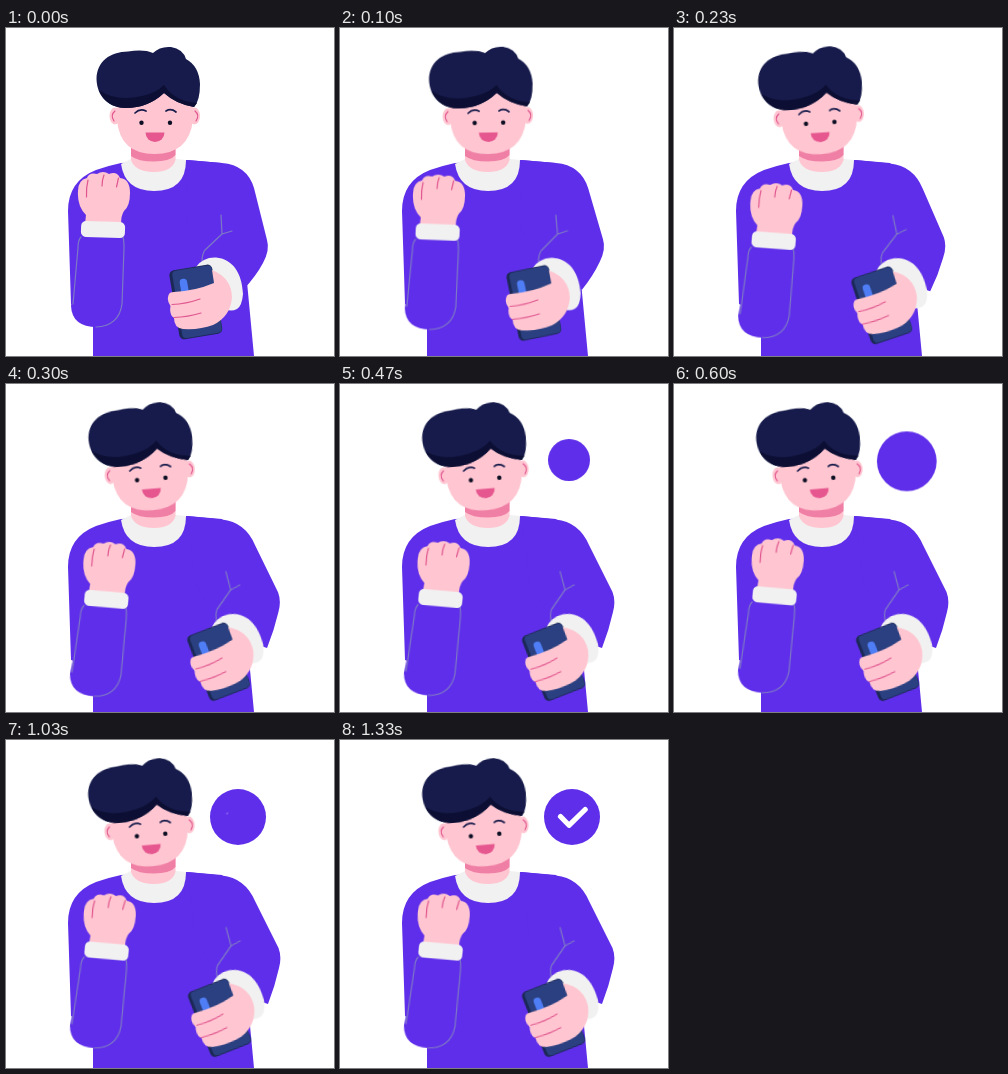
An HTML page that plays this animation: 328 px wide and 328 px high, repeating every 1960 ms.

```html
<!DOCTYPE html>
<html lang="en">
<head>
<meta charset="utf-8">
<title>Confirmed</title>
<style>
  html, body { margin: 0; width: 100%; height: 100%; overflow: hidden; background: #fff; }
  svg { display: block; width: 100vw; height: 100vh; }

  .purple { fill: #5f2eea; }
  .skin { fill: #ffc6d1; }
  .cloth { fill: #f1f1f1; }
  .hair { fill: #171b4b; }
  .line { fill: none; stroke-width: 1.2; stroke-linecap: round; stroke-linejoin: round; }
  .seam { stroke: #7d78c4; }
  .pink { stroke: #e0568f; }
  .brow { stroke: #171b4b; stroke-width: 1.7; }

  .head, .fist, .sleeve, .hand, .badge, .tick { animation: 1960ms linear infinite; }
  .head { transform-origin: 150px 148px; animation-name: tilt; }
  .fist { transform-origin: 90px 285px; animation-name: pump; }
  .sleeve { animation-name: bend; }
  .hand { transform-origin: 220px 163px; animation-name: swing; }
  .badge, .tick { transform-origin: 220px 73px; }
  .badge { animation-name: badge; }
  .tick { animation-name: tick; }

  @keyframes tilt {
    0% { transform: rotate(0deg); animation-timing-function: ease-in-out; }
    17.86%, 100% { transform: rotate(-5deg); }
  }
  @keyframes pump {
    0% { transform: translate(0, 0) rotate(0deg); animation-timing-function: ease-in-out; }
    17.4% { transform: translate(-1.5px, 13.7px) rotate(3.4deg); animation-timing-function: ease-in-out; }
    35.7%, 100% { transform: translate(-1.5px, 9px) rotate(3.5deg); }
  }
  @keyframes swing {
    0% { transform: rotate(0deg); animation-timing-function: ease-in-out; }
    17.86%, 100% { transform: rotate(-12deg); }
  }
  @keyframes bend {
    0% {
      d: path("M181 132 L216 135 Q241 137 248 160 L261 212 Q264 222 257 235 Q250 248 238 261 L200 250 L180 200 Z");
      animation-timing-function: ease-in-out;
    }
    17.86%, 100% {
      d: path("M181 132 L216 135.5 Q239 138 249 161 L272.5 208 Q276 217 273 228 Q269 246 262 264 L220 250 L190 200 Z");
    }
  }
  @keyframes badge {
    0%, 17.86% { transform: scale(0); animation-timing-function: cubic-bezier(.2, .5, .5, 1); }
    34% { transform: scale(1.1); animation-timing-function: ease-in-out; }
    44.2%, 100% { transform: scale(1); }
  }
  @keyframes tick {
    0%, 52.3% { transform: scale(0); animation-timing-function: cubic-bezier(.2, .5, .5, 1); }
    61.7% { transform: scale(1.05); animation-timing-function: ease-in-out; }
    67.9%, 100% { transform: scale(1); }
  }
</style>
</head>
<body>
<svg viewBox="0 0 328 328">
  <!-- torso, neck, collar -->
  <path class="purple" d="M115 135 Q101 138 90 142 Q62 153 62 183 L65 276 L87 284 V328 H248 L241 254 L240 170 L216 135 L181 132 Z"/>
  <path class="cloth" d="M115 136 L125 131 H170 L180 132 Q180 163 148 163 Q119 163 115 136 Z"/>
  <path class="skin" d="M125 112 H169.500 V132 Q166 144 148 144 Q129 144 125 132 Z"/>
  <path fill="#f07fa5" d="M125 112 H169.500 V127 Q164 133.500 148 133.500 Q132 133.500 125 128 Z"/>

  <g class="head">
    <ellipse class="skin" cx="109" cy="88" rx="5.5" ry="8.5"/>
    <ellipse class="skin" cx="188.5" cy="88" rx="5.5" ry="8.5"/>
    <path class="line pink" d="M109 83 Q104 87 108 93 M189 83 Q194 87 190 93"/>
    <path class="skin" d="M111 62 V92 Q114 126 148.500 126 Q183 126 187 92 V62 Z"/>
    <path class="hair" d="M90.500 51 C91 33 104 24 122 23.500 Q138 21 147 25 Q154 18 165 19 Q177 21 180 31 Q193 38 194 56 Q194 73 188 79 Q170 76 158 65 Q142 80 120 80 C103 80 91 69 90.500 51 Z"/>
    <path fill="#0c0f33" d="M93 62 Q110 74 136 68 Q150 65 158 57 Q168 73 191 75 L188 79 Q170 76 158 65 Q142 80 120 80 C107 80 97 73 93 62 Z"/>
    <path class="line brow" d="M129 85 Q134 80 140 83 M160 83 Q165 80 170 84"/>
    <circle cx="135.500" cy="94.700" r="2.200" fill="#0c0f23"/>
    <circle cx="164" cy="94.700" r="2.200" fill="#0c0f23"/>
    <path fill="#e6568f" d="M139.500 104.500 H158.500 A9.500 9.500 0 0 1 139.500 104.500 Z"/>
  </g>

  <g class="fist">
    <path class="purple" d="M75 209 L65 278 Q66 299 91 299 Q115 298 116 275 L118 209 Z"/>
    <path class="line seam" d="M75 209 Q72 212 72 220 L67 276 M117 209 Q118 212 118 220 L116 276 Q113 298 90 299"/>
    <path class="skin" d="M79 196 L80 187 Q71 178 72 163 Q72 152 81 150 Q83 144 91 146 Q97 142 103 146 Q111 143 114 150 Q124 151 124 165 Q124 178 118 183 Q115 187 115 197 Z"/>
    <path class="line pink" d="M82 152 Q80 160 80.500 169 M98 147 Q96 152 96 158 M112.500 150 L110.500 159"/>
    <rect class="cloth" x="75" y="193.500" width="44" height="16" rx="5" transform="rotate(2 97 202)"/>
  </g>

  <path class="purple sleeve" d="M181 132 L216 135 Q241 137 248 160 L261 212 Q264 222 257 235 Q250 248 238 261 L200 250 L180 200 Z"/>
  <g class="hand">
    <path class="line seam" d="M215 187 L216 206 L199 222 Q196 226 196 234 M216 206 L226 203"/>
    <path class="cloth" d="M190 239 Q197 229 210 229.500 C226 231 236 244 237 266 Q236 278 231 281 Q225 284 219 281 L208 246 Z"/>
    <g transform="rotate(-9.500 189.500 273.500)">
      <rect fill="#1b2857" x="168" y="239" width="43.500" height="70" rx="5"/>
      <rect fill="#2b4080" x="171" y="240" width="40" height="68" rx="4"/>
      <rect fill="#4f7df5" x="177" y="249" width="7.500" height="18" rx="3.700"/>
    </g>
    <path class="skin" d="M168 264 Q189 263 208 255 L206 242 Q226 250 226 270 Q224 289 207 297 Q194 302 177 301 Q168 300 168 290 Q163 287 164.500 278 Q160 272 163 266 Q164 264 168 264 Z"/>
    <path class="line pink" d="M166 276.500 Q180 276 194 271 M168 289.500 Q182 289 195 285"/>
  </g>

  <circle class="purple badge" cx="232" cy="77" r="28"/>
  <path class="tick" fill="none" stroke="#fff" stroke-width="5.200" stroke-linecap="round" stroke-linejoin="round" d="M220.500 76.500 L229 85.300 L245.200 69.500"/>
</svg>
</body>
</html>
```
